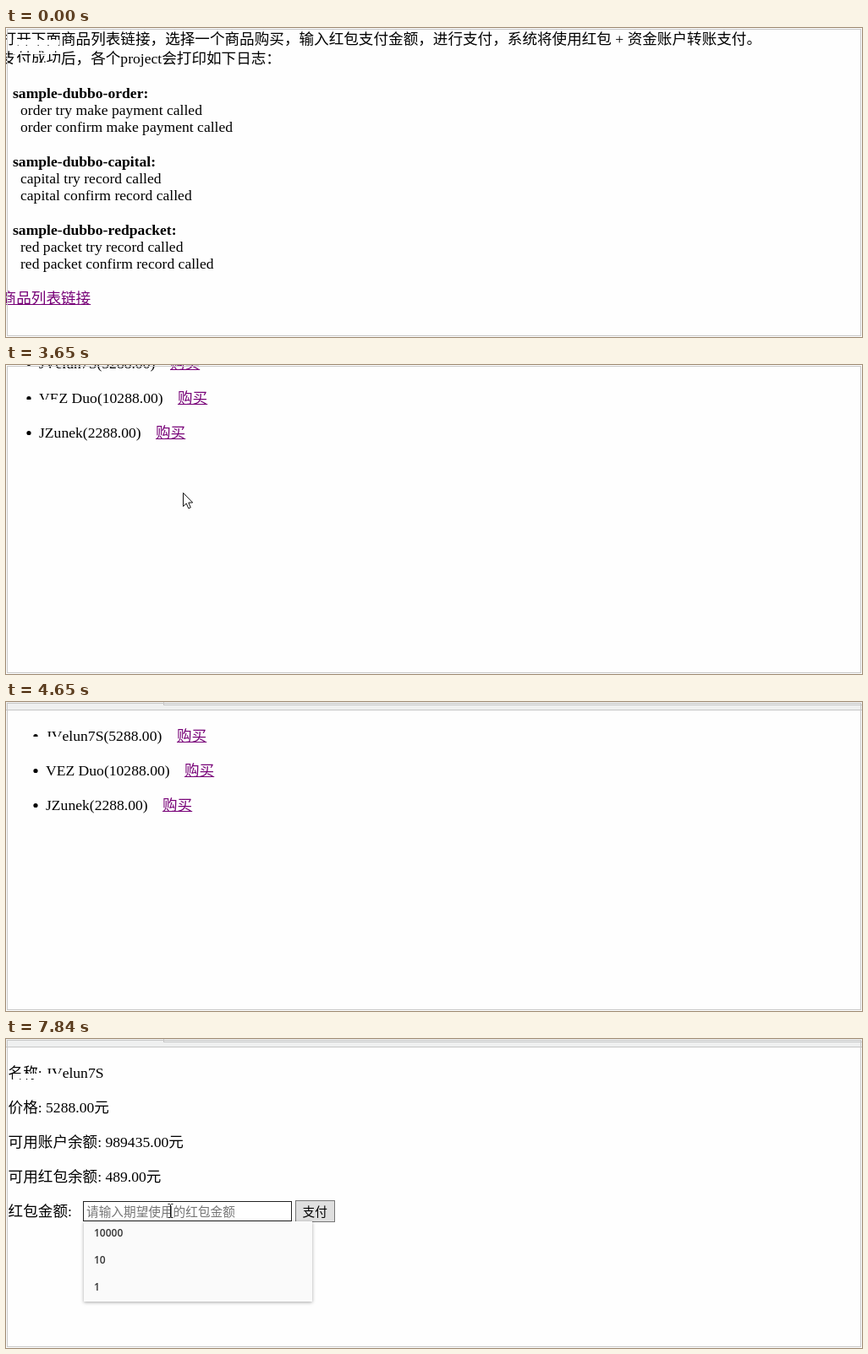
Write an HTML page with a canvas that moves like this. It is 1012 px wide and 366 px high and loops after 7.99 s.

```html
<!DOCTYPE html>
<html lang="zh">
<head>
<meta charset="utf-8">
<title>Payment demo</title>
<style>
html, body { margin: 0; width: 100%; height: 100%; overflow: hidden; background: #fefefe; }
canvas { display: block; }
</style>
</head>
<body>
<canvas id="stage" width="1012" height="366"></canvas>
<script>
const ctx = document.getElementById('stage').getContext('2d');
const LOOP = 7990, EM = 17.6;
const PAPER = '#fefefe', LINK = '#770077';
const SERIF = '"Liberation Serif", "Noto Sans CJK SC", "Noto Sans CJK", serif';
const SANS = '"Noto Sans CJK SC", "Noto Sans CJK", sans-serif';
const BODY = `${EM}px ${SERIF}`, BOLD = `bold ${BODY}`, FIELD = `14.67px ${SANS}`;

function text(s, x, y, font = BODY, color = '#000') {
  ctx.font = font;
  ctx.fillStyle = color;
  ctx.fillText(s, x, y);
}

function rect(x, y, w, h, color) {
  ctx.fillStyle = color;
  ctx.fillRect(x, y, w, h);
}

function frame(x, y, w, h, color) {
  ctx.strokeStyle = color;
  ctx.lineWidth = 1;
  ctx.strokeRect(x + 0.5, y + 0.5, w - 1, h - 1);
}

function link(s, x, y) {
  text(s, x, y, BODY, LINK);
  rect(x, y + 1, s.length * EM, 1, LINK);
}

function introPage() {
  text('打开下面商品列表链接，选择一个商品购买，输入红包支付金额，进行支付，系统将使用红包 + 资金账户转账支付。', -5.4, 19);
  text('支付成功后，各个project会打印如下日志：', -5.4, 42);
  const logs = [
    ['order', 'order', 'make payment'],
    ['capital', 'capital', 'record'],
    ['redpacket', 'red packet', 'record']
  ];
  logs.forEach(([module, subject, action], i) => {
    const y = 83 + i * 81;
    text(`sample-dubbo-${module}:`, 8, y, BOLD);
    text(`${subject} try ${action} called`, 17, y + 20);
    text(`${subject} confirm ${action} called`, 17, y + 40);
  });
  link('商品列表链接', -5.4, 326);
}

function listPage(dx, dy) {
  const goods = [['JVelun7S(5288.00)', 194], ['VEZ Duo(10288.00)', 203], ['JZunek(2288.00)', 177]];
  goods.forEach(([label, linkX], i) => {
    const y = 4 + i * 41 + dy;
    ctx.fillStyle = '#000';
    ctx.beginPath();
    ctx.arc(27 + dx, y - 5.5, 2.6, 0, 7);
    ctx.fill();
    text(label, 39 + dx, y);
    link('购买', linkX + dx, y);
  });
}

function payPage(t) {
  const rows = ['名称: JVelun7S', '价格: 5288.00元', '可用账户余额: 989435.00元', '可用红包余额: 489.00元', '红包金额:'];
  rows.forEach((s, i) => text(s, 2.6, 46 + i * 41));
  rect(91, 192, 247, 24, '#fff');
  frame(91, 192, 247, 24, t >= 7280 ? '#222' : t >= 7046 ? '#444' : '#7a7a7a');
  text('请输入期望使用的红包金额', 95, 210, FIELD, '#757575');
  rect(342, 191, 47, 26, '#dfdfdf');
  frame(342, 191, 47, 26, '#767676');
  text('支付', 350.5, 210, FIELD);
  if (t >= 7430) suggestions(Math.min(1, (tick(t, 7430, 82) + 1) / 4));
}

function suggestions(alpha) {
  ctx.save();
  ctx.globalAlpha = alpha;
  ctx.shadowColor = 'rgba(0,0,0,.35)';
  ctx.shadowBlur = 4;
  ctx.shadowOffsetY = 1;
  rect(92, 216, 270, 95, '#fafafa');
  ctx.shadowColor = 'transparent';
  ['10000', '10', '1'].forEach((s, i) =>
    text(s, 104, 234 + i * 32, '600 12px "Open Sans", sans-serif', '#333'));
  ctx.restore();
}

function windowEdge(dy) {
  const y = dy - 42;
  rect(0, y - 30, 1012, 40, '#eff0f0');
  rect(0, y + 9, 1012, 1, '#c6c6c6');
  rect(186, y + 3, 826, 1, '#c6c6c6');
  rect(186, y, 1, 4, '#c6c6c6');
}

// Blanked strips over the top left corner of the page
function blankCorner() {
  for (const [y, h] of [[14, 6], [29, 2], [41, 6]]) rect(8, y, 55, h, PAPER);
}

const ARROW = new Path2D('M.5 .5V16.5L4.2 13L6.8 18.8L9.3 17.8L6.8 12H11.7Z');
const HAND = new Path2D('M-1.5 14V2Q-1.5 .5 0 .5T1.5 2V8Q3.5 6.5 4.6 8.6Q6.7 7.3 7.8 9.6Q10.5 8.8 10.5 12V16Q10.5 19 8.5 21V23.5H-.5V21.5L-5 15.5Q-6.3 13 -4.6 12.2Q-3 12 -1.5 14Z');
const HAND_LINES = new Path2D('M1.5 8V12M4.6 8.6V12.5M7.8 9.6V13');
const BEAM = new Path2D('M-3 -7.5H-1L0 -6.5L1 -7.5H3M0 -6.5V7.5M-3 8.5H-1L0 7.5L1 8.5H3');

function cursor(kind, x, y) {
  ctx.save();
  ctx.translate(Math.round(x), Math.round(y));
  ctx.strokeStyle = '#111';
  ctx.lineWidth = 1;
  if (kind === 'beam') {
    ctx.translate(0.5, 0);
    ctx.stroke(BEAM);
  } else {
    const shape = kind === 'hand' ? HAND : ARROW;
    ctx.fillStyle = '#fff';
    ctx.fill(shape);
    ctx.stroke(shape);
    if (kind === 'hand') ctx.stroke(HAND_LINES);
  }
  ctx.restore();
}

function tick(t, start, step) {
  return Math.floor((t - start) / step);
}

// Pointer moves: start, end, tick length, then [tick, x, y] stops
const MOVES = [
  [1070, 1530, 77, [0, 43, 354], [2, 46, 336], [3, 48, 327]],
  [1530, 3250, 90, [0, 48, 324], [1, 49, 322]],
  [3250, 3950, 80, [0, 52, 317], [2, 104, 262], [5, 209, 151], [8, 303, 7]],
  [5030, 5960, 78, [0, 279, 91], [3, 262, 66], [6, 242, 34], [7, 235, 26], [10, 231, 41]],
  [5960, 6590, 80, [0, 231, 41]],
  [6590, 7430, 76, [0, 230, 48], [3, 214, 118], [5, 202, 179], [6, 198, 194], [7, 195, 203]],
  [7430, LOOP, 82, [0, 195, 203], [5, 194, 203]]
];

function pointer(t) {
  const move = MOVES.find(m => t >= m[0] && t < m[1]);
  if (!move) return null;
  const [start, , step, ...stops] = move;
  const n = tick(t, start, step);
  const i = stops.findIndex(s => s[0] > n);
  if (i < 0) return stops[stops.length - 1].slice(1);
  const [a, b] = [stops[i - 1], stops[i]];
  const k = (n - a[0]) / (b[0] - a[0]);
  return [a[1] + (b[1] - a[1]) * k, a[2] + (b[2] - a[2]) * k];
}

function pointerKind(t, y) {
  if (t >= 7046) return 'beam';
  if (t < 2780) return y <= 327 ? 'hand' : 'arrow';
  if (t >= 5030 && t < 5960) return y < 48 ? 'hand' : 'arrow';
  return 'arrow';
}

function scroll(t) {
  if (t < 4360) return 0;
  const n = Math.min(5, tick(t, 4360, 65));
  return 1 - Math.pow(1 - (n + 1) / 6, 2.71);
}

function draw(t) {
  rect(0, 0, 1012, 366, PAPER);
  const k = scroll(t), dy = Math.round(42 * k);
  if (t < 2870) introPage();
  else if (t < 5960) listPage(Math.round(8 * k), dy);
  else payPage(t);
  blankCorner();
  if (t >= 4360) windowEdge(dy);
  frame(1, 1, 1010, 364, '#c8c8c8');
  const at = pointer(t);
  if (at) cursor(pointerKind(t, at[1]), ...at);
}

ctx.fontKerning = 'none';
const begin = performance.now();
function loop() {
  draw((performance.now() - begin) % LOOP);
  requestAnimationFrame(loop);
}
loop();
</script>
</body>
</html>
```
